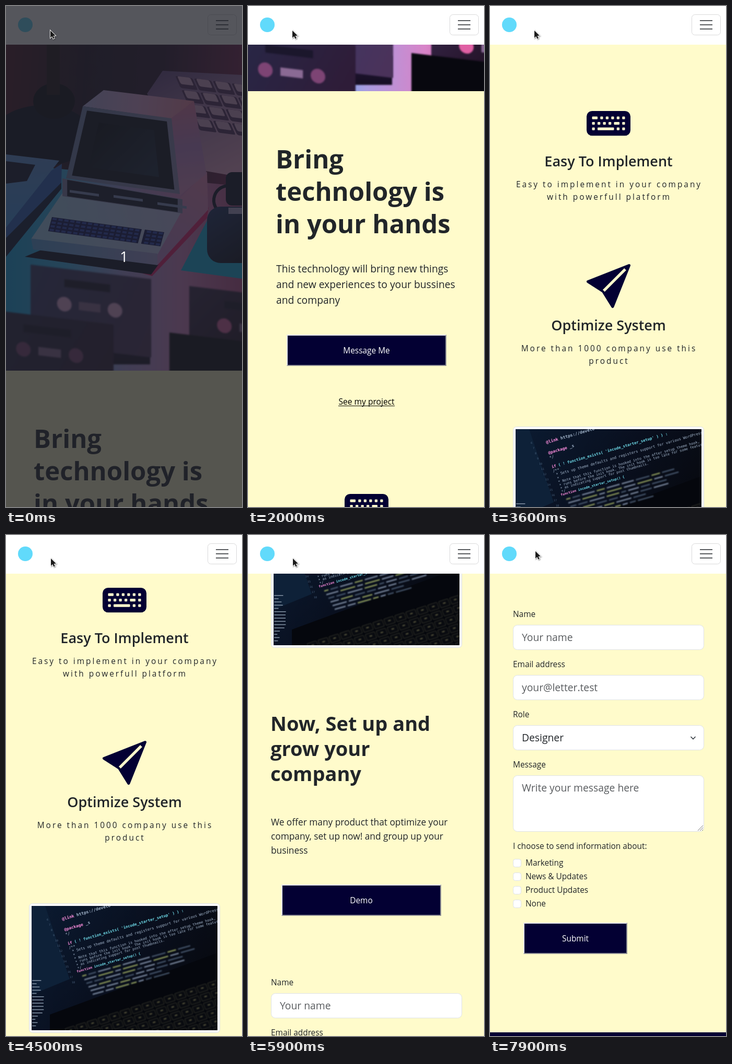
An HTML page with a canvas for the animation above (8000 ms loop, 452x959 px).

```html
<!DOCTYPE html>
<html lang="en">
<head>
<meta charset="utf-8">
<title>Landing page scroll</title>
<style>
  html, body { margin: 0; width: 100%; height: 100%; overflow: hidden; background: #fffbcb; }
  canvas { display: block; }
</style>
</head>
<body>
<canvas id="stage" width="452" height="959"></canvas>
<script>
const W = 452, H = 959, NAV = 74, LOOP = 8000, TICK = 100;
const CREAM = '#fffbcb', NAVY = '#030033', INK = '#212529', GREY = '#595c5f', LINE = '#dee2e6';
const SANS = '"Open Sans", "Noto Sans", sans-serif';
const MONO = '"DejaVu Sans Mono", "Noto Sans Mono", monospace';

// steady scroll bursts: start, end, distance
const BURSTS = [
  [1135, 2794, 1026], [3035, 3600, 242], [3835, 4100, 100],
  [4610, 5700, 675], [5800, 6600, 495], [7435, 7900, 272]
];

const stage = document.getElementById('stage').getContext('2d');
const sheet = document.createElement('canvas');
sheet.width = W;
sheet.height = 3800;
const g = sheet.getContext('2d');

const clamp = v => Math.min(1, Math.max(0, v));

let seed = 7;
const random = () => (seed = seed * 16807 % 2147483647) / 2147483647;

function poly(fill, ...p) {
  g.fillStyle = fill;
  g.beginPath();
  for (let i = 0; i < p.length; i += 2) g.lineTo(p[i], p[i + 1]);
  g.fill();
}

function box(fill, x, y, w, h) {
  g.fillStyle = fill;
  g.fillRect(x, y, w, h);
}

function oval(fill, x, y, rx, ry = rx) {
  g.fillStyle = fill;
  g.beginPath();
  g.ellipse(x, y, rx, ry, 0, 0, 7);
  g.fill();
}

function pill(fill, x, y, w, h, r) {
  g.fillStyle = fill;
  g.beginPath();
  g.roundRect(x, y, w, h, r);
  g.fill();
}

function shade(x0, y0, x1, y1, ...colors) {
  const s = g.createLinearGradient(x0, y0, x1, y1);
  colors.forEach((c, i) => s.addColorStop(i / (colors.length - 1), c));
  return s;
}

// pulls a quad's corners towards its centre
function inset(quad, k) {
  const mid = a => (quad[a] + quad[a + 2] + quad[a + 4] + quad[a + 6]) / 4;
  const c = [mid(0), mid(1)];
  return quad.map((v, i) => v + (c[i % 2] - v) * k);
}

// paints in a local frame: axes given by two slopes
function tilted(x, y, slope, lean, paint) {
  g.save();
  g.transform(1, slope, lean, 1, x, y);
  paint();
  g.restore();
}

function grid(rows, cols, paint) {
  for (let r = 0; r < rows; r++) for (let c = 0; c < cols; c++) paint(r, c);
}

function outlined(c, x, y, w, h, r, fill, stroke = LINE) {
  c.beginPath();
  c.roundRect(x + .5, y + .5, w - 1, h - 1, r);
  c.fillStyle = fill;
  c.fill();
  c.strokeStyle = stroke;
  c.lineWidth = 1;
  c.stroke();
}

function text(str, x, y, size, { weight = 400, color = INK, align = 'left', gap = 0 } = {}) {
  g.font = `${weight} ${size}px ${SANS}`;
  g.letterSpacing = gap + 'px';
  g.textAlign = align;
  g.fillStyle = color;
  g.fillText(str, x, y);
  g.letterSpacing = '0px';
}

function lines(list, x, y, step, size, opts) {
  list.forEach((s, i) => text(s, x, y + i * step, size, opts));
}

function clipped(x, y, w, h, dy, paint) {
  g.save();
  g.beginPath();
  g.rect(x, y, w, h);
  g.clip();
  g.translate(0, dy);
  paint();
  g.restore();
}

function cassette(x, y, w, body, hole) {
  tilted(x, y, .12, 0, () => {
    box(body, 0, 0, w, 150);
    if (!hole) return;
    box('#1b172c', w * .28, 20, w * .38, 15);
    box('#8a6a94', w * .4, 60, w * .18, 16);
    for (const k of [.28, .7]) oval(hole, w * k, 68, 14);
  });
}

// Old computers on a desk, lit cyan from the left and pink from the right
function deskPhoto() {
  box(shade(0, 400, W, 400, '#10a8ea', '#3cb6f2', '#a99be0', '#d884c8', '#c0508e'), 0, 30, W, 630);
  poly(shade(0, 80, W, 110, '#4a1526', '#1f1226', '#2c1630', '#74204e'), 0, 30, W, 30, W, 305, 0, 262);

  // joystick
  oval('#0a0c1c', 70, 208, 95, 58);
  oval('#090910', 92, 142, 40, 34);
  box('#1c0f16', 78, 30, 25, 100);

  // white keyboard
  poly(shade(300, 90, 400, 290, '#6d4c8a', '#b683b8', '#f0a8d0'), 300, 84, W, 92, W, 288, 372, 274, 270, 128);
  tilted(326, 94, .13, .45, () => grid(4, 5, (r, c) => {
    pill('#54305f', c * 36 - 2, r * 27, 33, 23, 3);
    pill('#d8a2cc', c * 36 + 2, r * 27, 25, 15, 3);
  }));

  // handheld
  poly('#0c1838', 0, 440, 0, 400, 106, 280, 106, 310);
  poly('#2a62c0', 0, 404, 0, 330, 107, 262, 106, 298);
  poly(shade(0, 250, 0, 390, '#5c92dc', '#3f9cf0'), 0, 244, 102, 256, 0, 384);
  poly('#10162e', 0, 257, 56, 264, 40, 295, 0, 300);

  // cast shadows
  poly('#12b4e6', 335, 466, 395, 352, W, 420, W, 482);
  poly('#ea1f72', 388, 345, 385, 366, 280, 477, 262, 472);
  poly('#0b1024', 36, 440, 108, 410, 292, 455, 278, 474);

  // base
  poly(shade(290, 430, 385, 290, '#c48cd4', '#f08cc0'), 336, 324, 385, 277, 387, 350, 290, 456, 290, 430);
  poly(shade(60, 400, 340, 350, '#a6d8fa', '#c8c4f2'), 108, 318, 337, 352, 290, 436, 48, 406);
  poly(shade(50, 0, 290, 0, '#58a4e4', '#a8a0dc'), 48, 405, 290, 434, 290, 456, 52, 426);
  const band = [108, 290, 338, 330, 338, 357, 108, 324];
  poly('#8284b0', ...band);
  poly('#14182e', ...inset(band, .08));
  tilted(122, 312, .14, 0, () => [0, 1, 2].forEach(i => box('#7f8fc0', i * 84, i % 2 * -2, 56, 5)));

  // monitor
  const bezel = [147, 152, 317, 175, 333, 320, 115, 290];
  poly(shade(150, 140, 350, 160, '#b4b0e6', '#e0a8de', '#f48cae'), 187, 121, 360, 142, 317, 176, 147, 152);
  poly(shade(340, 150, 360, 310, '#e87cae', '#c487d2', '#e494cc'), 360, 142, 384, 281, 333, 323, 316, 175);
  poly(shade(120, 200, 330, 250, '#6e80b0', '#8e8cb8'), ...bezel);
  poly('#0c0f1e', ...inset(bezel, .1));
  poly(shade(170, 180, 270, 280, '#04060d', '#16243a'), ...inset(bezel, .38));

  // keys
  tilted(88, 364, .135, -.27, () => {
    box('#0b1252', 0, 0, 172, 27);
    box('#0b1252', 178, 0, 37, 27);
    grid(4, 19, (r, c) => c !== 15 && box('#2b42b4', 2 + c * 11.3, 1 + r * 7, 8, 4));
  });

  // controller
  g.strokeStyle = '#12122a';
  g.lineWidth = 6;
  g.beginPath();
  g.arc(426, 332, 28, 1.9, 4.6);
  g.stroke();
  pill('#0d1026', 421, 278, 60, 64, 12);
  pill(shade(385, 350, W, 450, '#1a3066', '#090b1a'), 385, 344, 90, 108, 26);
  box('#b0a8d0', 426, 346, 30, 12);

  // cassettes, out of focus
  g.filter = 'blur(1.5px)';
  box(shade(0, 590, 0, 660, '#24183a', '#120c1c'), 200, 590, 76, 56);
  cassette(47, 455, 231, shade(0, 0, 230, 100, '#35396a', '#4a325a'), '#e6aadc');
  cassette(-34, 541, 240, shade(0, 0, 200, 110, '#272848', '#2e1c38'), '#7d4474');
  cassette(351, 496, 240, shade(0, 0, 100, 90, '#38284c', '#25142a'), '#e060a4');
  cassette(313, 585, 240, '#08080f');
  g.filter = 'none';
}

// Laptop with code, seen at an angle
function codePhoto() {
  box(shade(60, 720, 380, 940, '#0b1a30', '#090f1e', '#07080c'), 49, 710, 356, 238);
  poly('#0e2138', 49, 710, 75, 710, 122, 850, 49, 880);
  poly('#05070d', 84, 918, 405, 800, 405, 948, 84, 948);

  const code = [
    '@link https://develo', '', '@package _s', '*/', '',
    "if ( ! function_exists( 'incode_starter_setup' ) ) :", '/**',
    ' * Sets up theme defaults and registers support for various WordPress', ' *',
    ' * Note that this function is hooked into the after_setup_theme hook, which',
    ' * runs before the init hook. The init hook is too late for some features',
    ' * as indicating support for post thumbnails.', ' */',
    'function incode_starter_setup() {'
  ];
  g.textAlign = 'left';
  code.forEach((line, i) => {
    const p = i / (code.length - 1);
    const [, key, rest] = line.match(/^(@\w+|if|function)?(.*)/);
    g.save();
    g.translate(108 + 28 * p, 738 + 100 * p * (1.35 - .35 * p));
    g.rotate(-.28);
    g.font = `${key ? 'bold ' : ''}${8 - 1.6 * p}px ${MONO}`;
    g.fillStyle = '#ff8fe0';
    if (key) g.fillText(key, 0, 0);
    g.fillStyle = /incode/.test(rest) ? '#6fdcea' : '#a3b6cc';
    g.fillText(rest, key ? g.measureText(key).width : 0, 0);
    g.restore();
  });
  g.font = `5px ${MONO}`;
  g.fillStyle = '#4d6580';
  for (let i = 0; i < 13; i++) g.fillText(6 + i, 78 + i * 4, 738 + i * 10);

  g.filter = 'blur(.8px)';
  for (let i = 0; i < 6; i++) {
    tilted(146 + i * 4, 846 + i * 7, -.28, 0, () => {
      for (let x = 0; x < 210 - i * 18;) {
        const w = 8 + random() * 22;
        box(['#46566c', '#7c8aa0', '#8f9c5c'][random() * 3 | 0], x, -3, w, 2.5);
        x += w + 4;
      }
    });
  }
  tilted(196, 918, -.32, .4, () => grid(6, 15, (r, c) => {
    outlined(g, c * 21 - 84, r * 16, 19, 13, 2, '#090b10', '#35352c');
    box('#5c5a40', c * 21 - 77, r * 16 + 5, 5, 2);
  }));
  g.filter = 'none';
  for (let y = 852; y < 944; y += 6.2) box('#8594a6', 50, y, 6 + random() * 18, 1.5);
}

function keyboardIcon(x, y) {
  const u = 5.25;
  pill(NAVY, x, y, 16 * u, 9 * u, 2 * u);
  ['  ## # # # # #', '  # # # # ## #', '  # ###### # #'].forEach((row, r) => {
    for (const key of row.matchAll(/#+/g)) {
      pill(CREAM, x + key.index * u, y + (2 + r * 2) * u, key[0].length * u, u, 1.3);
    }
  });
}

function planeIcon(x, y) {
  g.save();
  g.translate(x, y);
  g.scale(5.25, 5.25);
  g.lineJoin = 'round';
  g.lineWidth = 1;
  g.fillStyle = g.strokeStyle = NAVY;
  const body = new Path2D('M15.5.5 .5 6.4 6 9.9 9.5 15.5Z');
  g.fill(body);
  g.stroke(body);
  g.strokeStyle = CREAM;
  g.stroke(new Path2D('M6.25 9.75 14.1 1.9'));
  g.restore();
}

function feature(title, y, sub) {
  text(title, 227, y, 27, { weight: 600, align: 'center' });
  lines(sub, 228, y + 40, 24, 15.4, { align: 'center', gap: 3 });
}

function button(label, x, y, w) {
  const h = 60;
  box('#8d8d94', x, y, w, h);
  poly('#e3e3e8', x, y + h, x, y, x + w, y, x + w - 2, y + 2, x + 2, y + 2, x + 2, y + h - 2);
  box(NAVY, x + 2, y + 2, w - 4, h - 4);
  text(label, x + w / 2, y + 36, 15.4, { color: '#fff', align: 'center' });
}

function form(x, y) {
  const fields = { Name: 'Your name', 'Email address': 'your@letter.test', Role: 'Designer', Message: 'Write your message here' };
  Object.entries(fields).forEach(([label, value], i) => {
    const top = y + i * 96;
    text(label, x, top - 15, 15.4);
    outlined(g, x, top, 366, label === 'Message' ? 108 : 48, 8, '#fff');
    text(value, x + 17, top + 31, 19.3, { color: label === 'Role' ? INK : GREY });
  });
  g.strokeStyle = '#343a40';
  g.lineWidth = 1.6;
  g.stroke(new Path2D(`M${x + 340.5} ${y + 214} l4.5 4.5 l4.5 -4.5`));
  g.strokeStyle = '#777';
  g.lineWidth = 1;
  for (const d of [10, 6, 2]) g.stroke(new Path2D(`M${x + 364 - d} ${y + 394} l${d} ${-d}`));

  text('I choose to send information about:', x, y + 429, 15.4);
  ['Marketing', 'News & Updates', 'Product Updates', 'None'].forEach((s, i) => {
    outlined(g, x, y + 448 + i * 26, 16, 16, 4, '#fff');
    text(s, x + 24, y + 461 + i * 26, 15.4);
  });
  button('Submit', x + 20, y + 570, 199);
}

function paintPage() {
  box(CREAM, 0, 0, W, sheet.height);
  clipped(0, NAV, W, 624, 40, deskPhoto);
  lines(['Bring', 'technology is', 'in your hands'], 53, 846, 62, 49, { weight: 700 });
  lines(['This technology will bring new things', 'and new experiences to your bussines', 'and company'], 54, 1045, 30, 19.3);
  button('Message Me', 74, 1164, 306);
  text('See my project', 227, 1298, 15.6, { color: '#000', align: 'center' });
  box('#000', 173, 1300, 108, 1);

  keyboardIcon(185, 1469);
  feature('Easy To Implement', 1575, ['Easy to implement in your company', 'with powerfull platform']);
  planeIcon(185, 1762);
  feature('Optimize System', 1889, ['More than 1000 company use this', 'product']);

  outlined(g, 44, 2073, 366, 248, 6, '#fff');
  clipped(49, 2078, 356, 238, 1368, codePhoto);

  lines(['Now, Set up and', 'grow your', 'company'], 43, 2480, 48, 38, { weight: 700 });
  lines(['We offer many product that optimize your', 'company, set up now! and group up your', 'business'], 44, 2661, 27, 17.3);
  button('Demo', 64, 2774, 306);

  form(44, 2982);
  box(NAVY, 0, 3762, W, 60);
}

function paintNav() {
  stage.fillStyle = '#fff';
  stage.fillRect(0, 0, W, NAV);
  stage.fillStyle = '#61dafb';
  stage.beginPath();
  stage.arc(37, 36, 14, 0, 7);
  stage.fill();
  outlined(stage, 386, 16, 56, 40, 6, '#fff', '#d9d9da');
  stage.fillStyle = GREY;
  for (const y of [27, 35, 43]) stage.fillRect(402, y, 24, 2);
}

const arrow = new Path2D('M0 0 V15.5 L3.6 12.2 L6 17.6 L8.6 16.4 L6.3 11.2 L11 10.8 Z');
function paintCursor(t) {
  const nudge = t < 4500 ? 0 : 1;
  const lift = clamp((t - 7000) / 200);
  stage.save();
  stage.translate(85 + nudge + lift, 47 - 2 * nudge - 14 * lift);
  stage.scale(.9, .9);
  stage.lineWidth = 2;
  stage.strokeStyle = '#fff';
  stage.shadowColor = 'rgba(0,0,0,.45)';
  stage.shadowBlur = 2;
  stage.shadowOffsetX = stage.shadowOffsetY = 1;
  stage.stroke(arrow);
  stage.shadowColor = 'transparent';
  stage.fillStyle = '#1a1a1a';
  stage.fill(arrow);
  stage.restore();
}

function paintCountdown() {
  stage.fillStyle = 'rgba(32,34,42,.76)';
  stage.fillRect(0, 0, W, H);
  stage.fillStyle = '#fff';
  stage.font = `28px ${SANS}`;
  stage.textAlign = 'center';
  stage.fillText('1', 226, 490);
}

function scrollAt(t) {
  return Math.round(BURSTS.reduce((y, [from, to, d]) => y + d * clamp((t - from) / (to - from)), 0));
}

const start = performance.now();
function frame() {
  const t = Math.floor((performance.now() - start) % LOOP / TICK) * TICK;
  stage.drawImage(sheet, 0, -scrollAt(t));
  paintNav();
  if (t < TICK) paintCountdown();
  paintCursor(t);
  requestAnimationFrame(frame);
}

paintPage();
frame();
</script>
</body>
</html>
```
